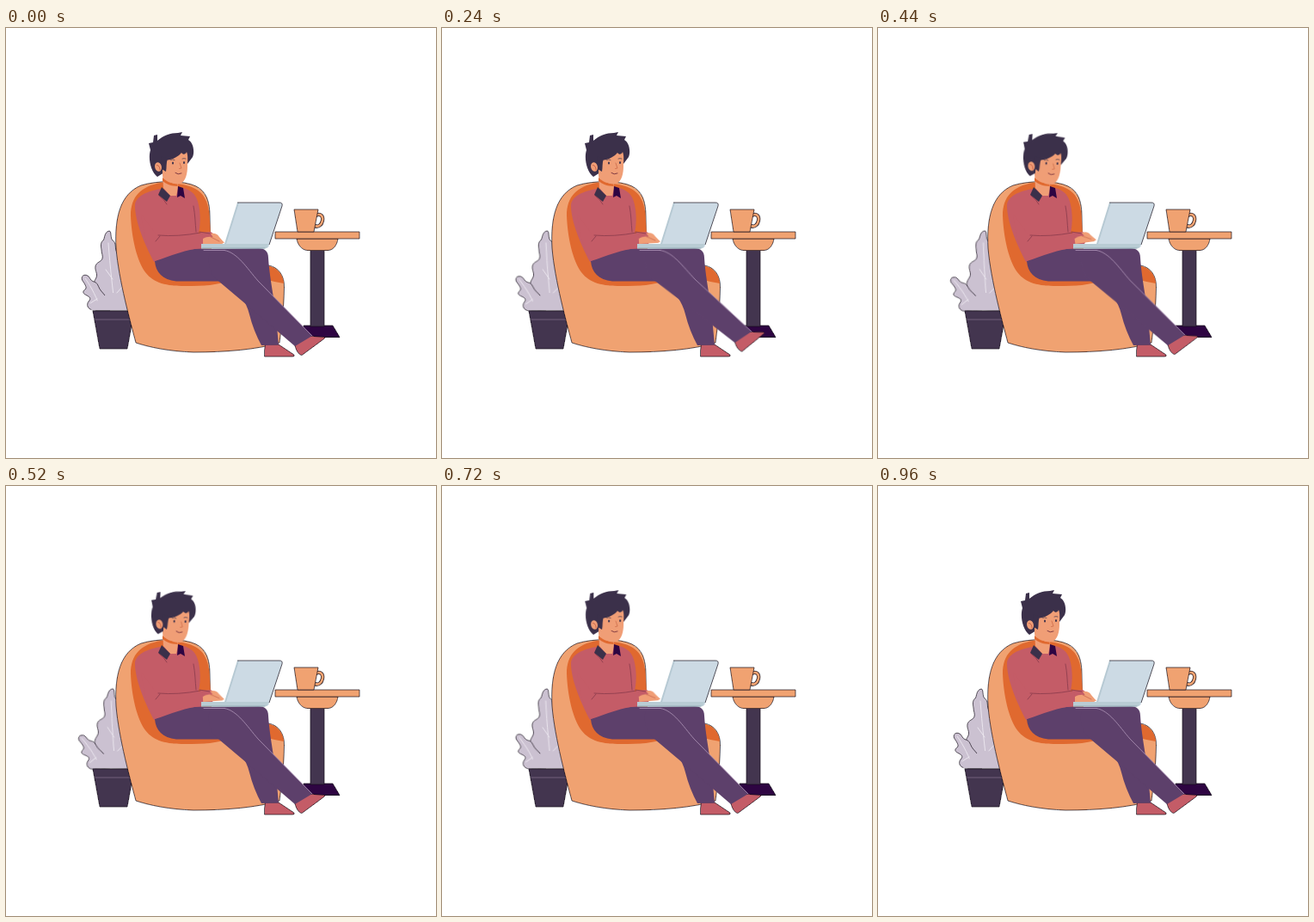
An HTML page for the animation above (1.32 s loop, 500x500 px).

```html
<!DOCTYPE html>
<html lang="en">
<head>
<meta charset="utf-8">
<title>Working from the armchair</title>
<style>
html, body { margin: 0; width: 100%; height: 100%; overflow: hidden; background: #fff; }
svg { display: block; width: 100vw; height: 100vh; }

.edge { stroke: #17101c; stroke-width: .7; stroke-linejoin: round; shape-rendering: crispEdges; }
.peach { fill: #f0a271; }
.rust { fill: #e0692f; }
.rose { fill: #c45c67; }
.skin { fill: #f09e76; }
.ink { fill: #3b304a; }
.plum { fill: #43354f; }
.night { fill: #2e0542; }
.pants { fill: #5d406b; }
.line { fill: none; stroke-width: .9; stroke-linecap: round; stroke-linejoin: round; }
.fold { stroke: #8f3f50; }
.seam { stroke: #a88db0; }
.vein { stroke: #eee9f1; }

/* Poses advance every 40 ms, then rest from 960 ms to the end. */
.head, .leaf, .sprig, .shin, .hand, .plant { animation: 1320ms infinite; }
.head { transform-origin: 190px 184px; animation-name: nod; }
.leaf { transform-origin: 126px 328px; animation-name: sway; }
.sprig { transform-origin: 114px 328px; animation-name: lean; }
.shin { transform-origin: 252px 272px; animation-name: kick; }
.hand { transform-origin: 230px 248px; animation-name: type; }
.plant { fill: #cbc1d1; animation-name: tint; }

@keyframes nod {
  0%, 18.1818% { transform: rotate(0deg); animation-timing-function: steps(2); }
  24.2424% { transform: rotate(.8deg); animation-timing-function: steps(2); }
  30.303% { transform: rotate(3deg); animation-timing-function: steps(1); }
  33.3333%, 39.3939% { transform: rotate(3.5deg); animation-timing-function: steps(2); }
  45.4545% { transform: rotate(2.4deg); animation-timing-function: steps(2); }
  51.5152% { transform: rotate(.5deg); animation-timing-function: steps(3); }
  60.6061%, 100% { transform: rotate(0deg); }
}
@keyframes sway {
  0% { transform: rotate(0deg); animation-timing-function: steps(6); }
  18.1818% { transform: rotate(1.4deg); animation-timing-function: steps(5); }
  33.3333% { transform: rotate(2.6deg); animation-timing-function: steps(2); }
  39.3939% { transform: rotate(2.5deg); animation-timing-function: steps(4); }
  51.5152% { transform: rotate(1.5deg); animation-timing-function: steps(3); }
  60.6061% { transform: rotate(.6deg); animation-timing-function: steps(4); }
  72.7273%, 100% { transform: rotate(0deg); }
}
@keyframes lean {
  0% { transform: rotate(0deg); animation-timing-function: steps(6); }
  18.1818% { transform: rotate(-3.6deg); animation-timing-function: steps(5); }
  33.3333%, 39.3939% { transform: rotate(-6deg); animation-timing-function: steps(4); }
  51.5152% { transform: rotate(-4.2deg); animation-timing-function: steps(3); }
  60.6061% { transform: rotate(-2.2deg); animation-timing-function: steps(4); }
  72.7273%, 100% { transform: rotate(0deg); }
}
@keyframes kick {
  0% { transform: rotate(0deg); animation-timing-function: steps(6); }
  18.1818% { transform: rotate(-2.7deg); animation-timing-function: steps(5); }
  33.3333% { transform: rotate(-.6deg); animation-timing-function: steps(2); }
  39.3939%, 100% { transform: rotate(0deg); }
}
@keyframes type {
  0% { transform: rotate(0deg); animation-timing-function: steps(6); }
  18.1818% { transform: rotate(-3deg); animation-timing-function: steps(5); }
  33.3333% { transform: rotate(-8deg); animation-timing-function: steps(2); }
  39.3939% { transform: rotate(-4deg); animation-timing-function: steps(7); }
  60.6061% { transform: rotate(-5deg); animation-timing-function: steps(4); }
  72.7273%, 100% { transform: rotate(0deg); }
}
@keyframes tint {
  0%, 60.6061% { fill: #cbc1d1; animation-timing-function: step-end; }
  60.6062% { fill: #c8d4de; animation-timing-function: step-end; }
  63.6364%, 100% { fill: #cbc1d1; animation-timing-function: step-end; }
}
</style>
</head>
<body>
<svg viewBox="0 0 500 500">
  <!-- plant -->
  <g class="plant">
    <g class="leaf">
      <path class="edge" d="M104 328C106 318 103 309 102 302C101 295 104 293 105 290C107 286 103 282 104 277C105 272 111 272 112 268C113 265 111 262 111 258C110 253 110 249 113 247C115 245 114 237 120 236C123 236 121 244 124 247C129 250 126 256 129 261C134 268 130 275 134 282C138 290 144 306 148 328Z"/>
      <path class="line vein" d="M119 250C121 278 124 304 127 327M127 310L138 298M124 292L116 281"/>
    </g>
    <g class="sprig">
      <path class="edge" d="M101 328C95 327 93 322 96 318C99 315 98 313 94 311C90 309 88 307 92 304C95 302 91 297 88.500 293C87 288 91 286 95 288C98 290 98 294 102 295C107 296 107 301 110 305C114 310 121 316 121 328Z"/>
      <path class="line vein" d="M92 291C100 302 106 315 110 327M106 315L98 320"/>
    </g>
    <path d="M99 328C103 318 115 308 126 308C138 308 146 317 147 328Z"/>
  </g>
  <path class="plum edge" d="M101 329H149L141 373H109Z"/>
  <path class="line" stroke="#78657f" d="M104 339H146"/>

  <!-- side table -->
  <path class="night edge" d="M346 346H380L388 359.5H345Z"/>
  <path class="plum edge" d="M354 258H370V347H354Z"/>
  <path class="peach edge" d="M338 245H386C385 252 381 258 375 258.5H350C344 258 339 252 338 245Z"/>
  <path class="peach edge" d="M313 237H411V245H313Z"/>
  <path fill="none" stroke="#17101c" stroke-width="4.2" d="M360 218C366 215 369 219 368 224C367 229 363 232 359 230"/>
  <path fill="none" stroke="#f0a271" stroke-width="2.8" d="M360 218C366 215 369 219 368 224C367 229 363 232 359 230"/>
  <path class="peach edge" d="M335 211H363L358 237H339Z"/>

  <!-- armchair -->
  <path class="peach edge" d="M151 366C145 343 131 293 128 256C126 220 133 193 157 183C176 177 207 177 221 184C233 190 237 202 237 219L238 276H305C317 278 324 288 323.500 302C323 329 320 350 318 366C292 374 255 377 218 377C189 376 166 371 151 366Z"/>
  <path class="rust" d="M180 180C157 184 145 196 145 218C146 244 152 270 162 284C172 297 187 300 208 300C231 300 246 299 258 294L240 272L237 224C236 200 229 189 213 184C203 181 191 179 180 180Z"/>
  <path class="rust" d="M302 276C315 278 322 286 323 297C316 296 309 294 300 292Z"/>

  <!-- rear leg -->
  <path class="rose edge" d="M301.500 368H317L335 380Q336 382 333 382H300.500Q300 375 301.500 368Z"/>
  <path class="pants" d="M226 257L294 256C301 256 305 260 305 267C306 285 310 306 313 326L317 368.500L297 369C291 358 286 345 283 333C281 325 278 319 274 313L258 279Z"/>

  <!-- torso and far sleeve -->
  <path class="rose" d="M180 187C163 190 150 196 150 207C150 224 160 249 172 272L228 257C227 250 226 244 225 238L238 237L245 242L240 251H224L224 238C227 226 226 209 222 199C219 192 214 188 206 186Z"/>
  <path class="line fold" d="M225 237L237 239"/>

  <!-- front leg -->
  <path class="pants" d="M173 271C187 265 205 256 230 256.500L258 258C268 262 271 270 269 279C267 289 259 295 248 294.500L198 294.500C182 293 174 284 173 271Z"/>
  <g class="shin">
    <path class="rose edge" d="M336 369L352 358L370 359.500Q372 360 369 362L344 380.500C340 380 337 374 336 369Z"/>
    <path class="pants" d="M238 260C248 256 257 257 265 264C281 277 288 289 299 300L356 358L336 370L280 322L248 295C236 287 233 267 238 260Z"/>
    <path class="line seam" d="M254 258.500C269 261 280 279 293 294L356 358"/>
  </g>
  <path class="line seam" d="M230 258.500L254 258.500"/>

  <!-- neck and collar -->
  <path class="skin" d="M182 168L199 175L200 187L198 195L191 195L183 186Z"/>
  <path class="rust" d="M182 174C187 179 193 181 199 181L199.500 184C192 184 186 181 182 178Z"/>
  <path class="ink" d="M181 185L191 195L187 202L177 194Z"/>
  <path class="night" d="M200 184L206 186L208 198L203 195L199 197Z"/>

  <!-- head -->
  <g class="head">
    <path class="ink" d="M176 173C168 167 165 151 168 142L166 134L171 133L172 125L176 124L176 131C183 125 191 122 200 122L205 121L203 125L214 126L212 130C219 134 219 146 217 150L211 158L184 168Z"/>
    <path class="skin" d="M182 155L188 153.500C194 153 201 149 204 145C206 148 209 147 210 144C212 148 211 156 211 161C211 169 209 178 203 181C196 183 186 178 182 172Z"/>
    <path class="ink" d="M180 149L188 152C186 157 187 162 186 167L181 164Z"/>
    <ellipse class="skin" cx="177" cy="161.500" rx="3.900" ry="5.400" transform="rotate(-12 177 161.500)"/>
    <path class="line" stroke="#c65d45" d="M175.500 159.500C178 159.500 179 162 179 165"/>
    <path class="line" stroke="#332d48" stroke-opacity=".7" d="M191.500 153.500Q193.500 152 196 153.500M205 152Q207 151 209 152"/>
    <ellipse class="ink" cx="194" cy="157" rx="1" ry="1.500"/>
    <ellipse class="ink" cx="207" cy="156.500" rx="1" ry="1.500"/>
    <path class="line" stroke="#d07250" d="M202 157L204 163L201.500 163.500"/>
    <path class="line" stroke="#74303d" d="M197 168.500Q200 171 204 169"/>
  </g>

  <!-- near arm -->
  <path class="rose" d="M157 216L176 242L228 239L230 250L229 256C211 256 190 266 173 271C165 259 160 240 157 216Z"/>
  <path class="line fold" d="M178 195Q184 199 187 205M218 207C220 217 220 227 221 237M177 241Q200 243 226 238M174 248L179 242"/>

  <!-- laptop and hand -->
  <path fill="#b6c9d3" d="M269 203H317L301 253L254 251Z"/>
  <path fill="#ccdae4" d="M271 203H318Q322 203 321 207L306 253Q305 256 302 256L256 251Z"/>
  <path class="edge" fill="none" d="M269 203H318Q322 203 321 207L306 252"/>
  <path fill="#b9ccd4" d="M227 251H305Q305 256.500 300 256.500H227Z"/>
  <path class="line" stroke="#8da7b2" d="M228 256H301"/>
  <g class="hand">
    <path class="skin" d="M229 245C234 242 240 242 245 245L252 248Q254 250 251 251H229Z"/>
    <path class="skin" d="M238 239Q245 238 248 243L254 250H245Z"/>
    <path class="line" stroke="#cf6f54" d="M238 243L248 248"/>
  </g>
</svg>
</body>
</html>
```
